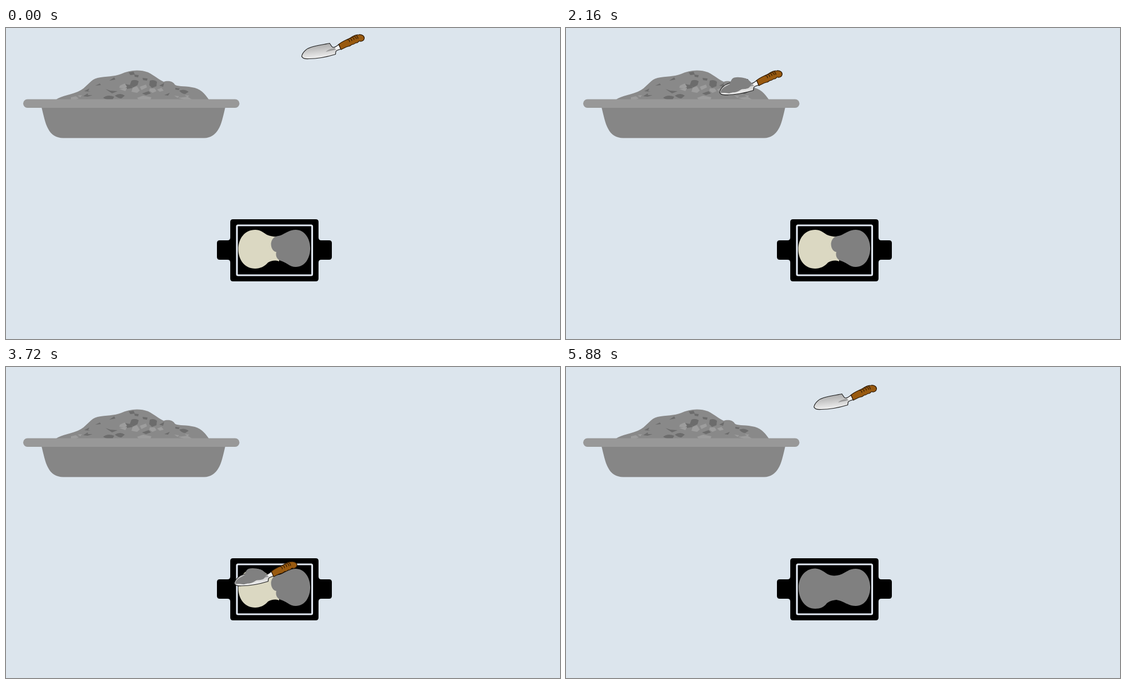
An HTML page for the animation above (5.92 s loop, 998 by 561 pixels).

```html
<!DOCTYPE html>
<html lang="en">
<head>
<meta charset="utf-8">
<title>Filling a mould</title>
<style>
html, body { margin: 0; width: 100%; height: 100%; overflow: hidden; background: #dce5ed; }
svg { display: block; width: 998px; height: 561px; }
</style>
</head>
<body>
<svg viewBox="0 0 998 561">
  <defs>
    <linearGradient id="steel" x1=".25" y1="0" x2=".5" y2="1">
      <stop offset=".1" stop-color="#aaa"/><stop offset=".5" stop-color="#ccc"/><stop offset="1" stop-color="#f6f6f6"/>
    </linearGradient>
    <g id="trowel" stroke-linejoin="round" stroke-linecap="round">
      <path fill="url(#steel)" stroke="#1c1c1c" stroke-width="1.2" d="M.7 40C2 33 9 26 18 23.5C30 20 42 18.5 51 16.5C53 19 54 23 57 24C61 24 65 21 67.5 18.5L71.5 27C68 28 64 29 62.5 31C61.5 33 62 35 61.5 36.5C50 40 30 44.5 14 44.5C8 45 2 44.5 .7 40Z"/>
      <path fill="#999" d="M44 32Q49 27 57 26L67 23Q63 28 58 29Q52 30 44 32Z"/>
      <path fill="#f4f4f4" d="M60 25L67 20L70 26L63 28Z"/>
      <path fill="#995a10" stroke="#2a1704" stroke-width="1.2" d="M67.5 18.5C72 14 80 11 88 7C94 3 98 1 104 .9C110 .3 114 4 113.4 8C113 12 108 14 105 12.5C102 13 103 16 99 16C97 15 96 19 92 18.5C90 19 88 22 85 22C80 23 76 26 71.5 28Z"/>
      <path fill="none" stroke="#2a1704" stroke-width="1.2" d="M83 10q4 0 4 4M87 8q4 0 4 4M91 6q4 0 4 4M95 4.5q4 0 4 4M99 3q3 1 3 5"/>
    </g>
  </defs>

  <path d="M409 345H558Q563 345 563 350V378Q563 383 568 383H582Q587 383 587 388V413Q587 418 582 418H568Q563 418 563 423V452Q563 457 558 457H409Q404 457 404 452V423Q404 418 399 418H385Q380 418 380 413V388Q380 383 385 383H399Q404 383 404 378V350Q404 345 409 345Z"/>
  <rect x="416" y="356" width="135.500" height="90" rx="2" fill="none" stroke="#e2e9f3" stroke-width="3.200"/>
  <g id="half">
    <path fill="#dbd8c2" d="M449 364C458 364 464 369 470 373C477 376 485 377 492 376V421C484 418 478 420 472 423C466 430 458 434 449 434C430 434 418.500 418 418.500 399C418.500 380 430 364 449 364Z"/>
    <path fill="#808080" d="M522 364C538 364 548 380 548 397C548 416 538 431 522 431C512 431 506 424 498 421C488 419 485 411 487 404C480 403 477 395 477.500 388C479 380 483 376 491 375C500 374 508 364 522 364Z"/>
  </g>
  <path id="full" fill="#808080" d="M449 363.500C459 364 465 370 472 374C478 377 486 377 493 375C503 372 508 364 522 364C538 364 548 380 548 397C548 416 538 431 522 431C508 431 500 422 487 420C478 421 474 423 470 426C465 433 458 436 449 436C430 436 419 418 419 398C419 380 430 363.500 449 363.500Z"/>

  <use id="back" href="#trowel"/>

  <path fill="#898989" d="M89 130C100 121 120 121 135 112C148 104 152 93 165 90C180 87 195 88 207 83C222 76 240 74 256 80C268 86 275 93 284 97C290 95 300 95 304 102C308 106 320 104 335 107C350 109 358 118 366 130Z"/>
  <path fill="#6c6c6c" d="M221 80l9-1 2 5-8 1zM231 84l8 1-1 4-6-1zM246 90l9 1-1 4-7-1zM259 95q8-3 13 2l-1 8-8 3-5-5zM226 95q7-3 13 1l-2 7-8 4-6-4zM214 101l10 2 5 5-11 2zM175 126q8-7 20-2l-3 5q-9 2-17-3zM196 122q10-6 18 0l-6 5q-6 0-12-5zM179 110l9 3 13 1-10 4zM141 114l9-5-2 5 5 1zM139 123l8-5 1 3 8 0-9 3zM161 104l8-4 2 3zM186 95l9-6 2 4zM305 108l8 1-2 3-6-1zM312 113q9-4 17 2l-6 4q-6 0-11-6zM245 118l12-4 4 4-9 3zM276 104l9-5-2 7zM285 121l10-4-3 5z"/>
  <path fill="#9d9d9d" d="M117 125l9-2 5 4-7 3-7-1zM129 122l8-1-3 4zM205 104l9-4 4 6-5 3-9-1zM204 110l14-2-3 6zM228 108l8-3 5 8-5 4-10-2zM241 106l11-4 2 5-10 5zM259 109l9 0 3 5-7 3-6-4zM236 126l11-4 15 3-2 5-10 1-11-2zM272 111l8-3 4 5-7 2zM303 122l9 1-3 3zM310 126l17-2 8 5-15 0zM322 121l8 1-3 3z"/>
  <path fill="#868686" d="M64 143H395C391 160 388 174 383 182Q374 198 357 198.500H103Q84 198 76 182C70 171 68 158 64 143Z"/>
  <rect x="31" y="128.500" width="389.500" height="15.500" rx="7.700" fill="#989898"/>

  <g id="front">
    <use href="#trowel"/>
    <path id="load" fill="#808080" d="M3 37C6 31 14 29 19 25C21 20 22 15 27 13.500C33 12 40 13 46 14.500C50 15 55 19 59 24C56 28 55 32 51 33C45 35 42 33 38 36C30 42 24 39 18 42L10 41L2 41Z"/>
  </g>
</svg>
<script>
const LOOP = 5920, MOVE = 1725, SCOOP = 1960, POUR = 3990;
const stops = [[532, 11], [276, 76], [413, 355], [446, 32]];
const starts = [105, 2155, 4148];
const el = id => document.getElementById(id);
const show = (id, on) => el(id).style.display = on ? '' : 'none';
const clamp = u => Math.min(1, Math.max(0, u));
const ease = u => u < .5 ? 2 * u * u : 1 - 2 * (1 - u) ** 2;

function draw(now) {
  const t = now % LOOP;
  let [x, y] = stops[0];
  starts.forEach((start, i) => {
    const k = ease(clamp((t - start) / MOVE));
    x += (stops[i + 1][0] - stops[i][0]) * k;
    y += (stops[i + 1][1] - stops[i][1]) * k;
  });
  for (const id of ['back', 'front']) el(id).setAttribute('transform', `translate(${x} ${y})`);
  // The trowel digs in behind the heap and comes out in front of it.
  show('back', t < SCOOP);
  show('front', t >= SCOOP);
  show('load', t < POUR);
  show('half', t < POUR);
  show('full', t >= POUR);
  requestAnimationFrame(draw);
}
draw(0);
</script>
</body>
</html>
```
